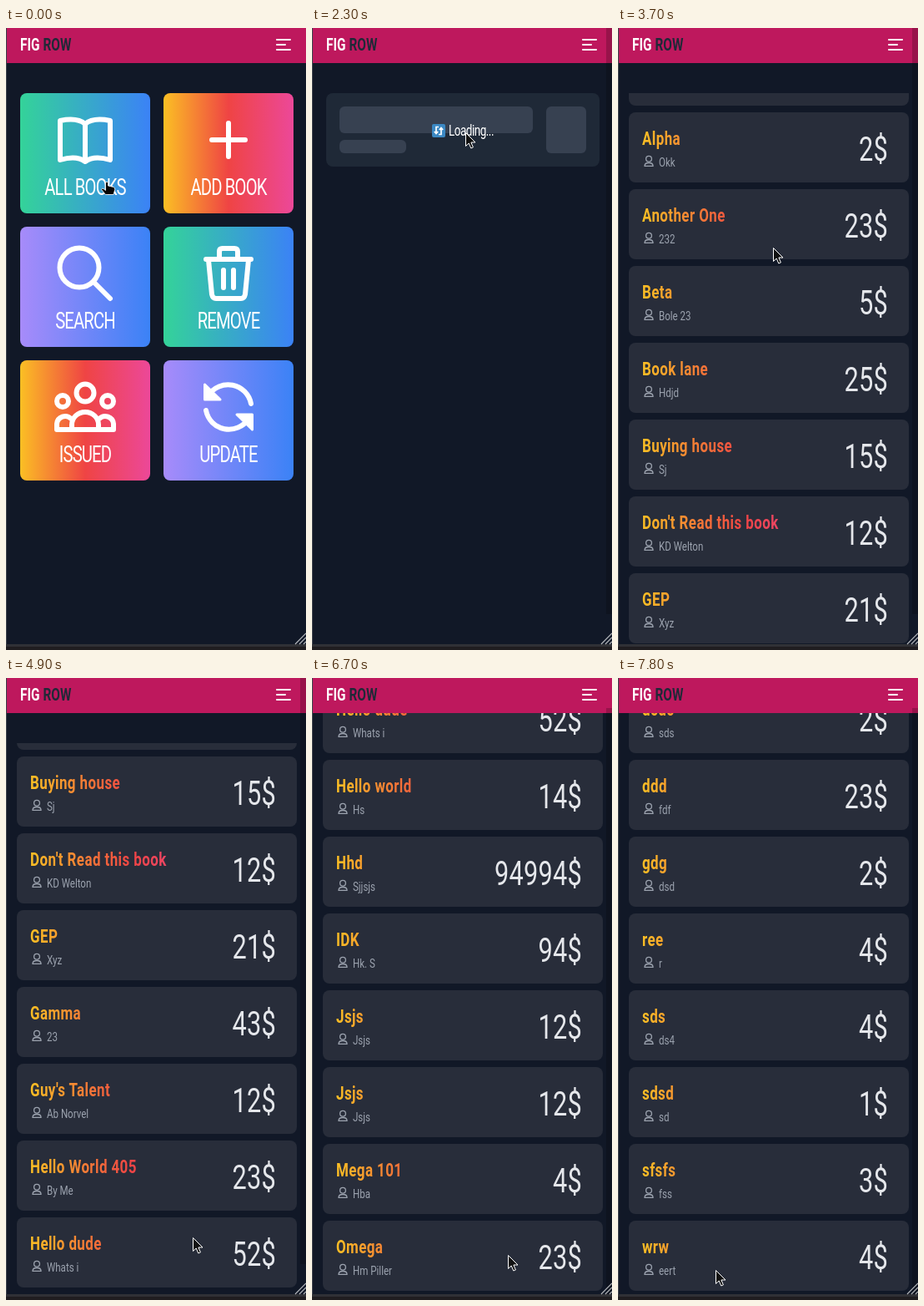
Recreate the animation shown at these times as an HTML page. Size 360 by 745 pixels, loop 8 s.

```html
<!DOCTYPE html>
<html lang="en">
<head>
<meta charset="utf-8">
<title>Book list</title>
<style>
html, body { margin: 0; width: 100%; height: 100%; overflow: hidden; background: #111827; }
svg { display: block; width: 360px; height: 745px; }
text { font-family: Roboto, "Open Sans", sans-serif; fill: #fff; white-space: pre; }
.logo { font-size: 20.5px; font-weight: 700; }
.caption { font-size: 27px; letter-spacing: -1.15px; text-anchor: middle; }
.loading { font-size: 18px; letter-spacing: -.65px; }
.title { font-size: 22.6px; font-weight: 700; letter-spacing: .55px; fill: url(#ink); }
.author { font-size: 15.4px; fill: #9ca3af; }
.price { font-size: 41px; letter-spacing: .3px; text-anchor: end; fill: #e5e7eb; }
.icon { fill: none; stroke: #fff; stroke-width: 6; stroke-linecap: round; stroke-linejoin: round; }
.person { fill: none; stroke: #9ca3af; stroke-width: 1.3; }
</style>
</head>
<body>
<svg id="stage" viewBox="0 0 360 745"></svg>
<script>
const CONDENSE = 0.75, LOOP = 8000, STEP = 100;
const CARD = 84, PITCH = 92, LIST_TOP = 86, PAGE_SHIFT = 36;

const books = `A lovely evening|Me|12
Abc|Xyz|5
Algo 101|Some crazy dude|52
Alpha|Okk|2
Another One|232|23
Beta|Bole 23|5
Book lane|Hdjd|25
Buying house|Sj|15
Don't Read this book|KD Welton|12
GEP|Xyz|21
Gamma|23|43
Guy's Talent|Ab Norvel|12
Hello World 405|By Me|23
Hello dude|Whats i|52
Hello world|Hs|14
Hhd|Sjjsjs|94994
IDK|Hk. S|94
Jsjs|Jsjs|12
Jsjs|Jsjs|12
Mega 101|Hba|4
Omega|Hm Piller|23
Open sky|Me|12
Qwe|Rty|5
Test 12|Sj|23
Xyz|Abc|4
asd|dsa|2
bcb|sd|3
dcdc|sds|2
ddd|fdf|23
gdg|dsd|2
ree|r|4
sds|ds4|4
sdsd|sd|1
sfsfs|fss|3
wrw|eert|4`.split('\n').map(row => row.split('|'));

const rect = (x, y, w, h, fill, r = 0) =>
  `<rect x="${x}" y="${y}" width="${w}" height="${h}" rx="${r}" fill="${fill}"/>`;
const text = (cls, x, y, str, extra = '') =>
  `<text class="${cls}" transform="translate(${x} ${y}) scale(${CONDENSE} 1)" ${extra}>${str}</text>`;
const gradient = (id, colors, attrs = '') =>
  `<linearGradient id="${id}" ${attrs}>${colors.map((c, i) =>
    `<stop offset="${i / (colors.length - 1)}" stop-color="${c}"/>`).join('')}</linearGradient>`;

const WARM = ['#fbbf24', '#ef4444', '#ec4899'];

// Icon paths are relative to the centre of each tile's icon area.
const tiles = [
  ['ALL BOOKS', 'sea', '<path d="M0 -19C-8 -26 -20 -25 -30 -23V24C-20 21 -8 20 0 26C8 20 20 21 30 24V-23C20 -25 8 -26 0 -19V25"/>'],
  ['ADD BOOK', 'warm', '<path d="M-20 0H20M0 -20V20"/>'],
  ['SEARCH', 'violet', '<circle cx="-7" cy="-7" r="23.5"/><path d="M10 10L30 30"/>'],
  ['REMOVE', 'sea', '<path d="M-27 -17H27M-11 -18V-26Q-11 -30 -7 -30H7Q11 -30 11 -26V-18M-24 -16L-20 25Q-19 30 -15 30H15Q19 30 20 25L24 -16M-6 -4V17M6 -4V17"/>'],
  ['ISSUED', 'warm', '<circle cy="-17" r="10.5"/><circle cx="-27" cy="-7" r="7"/><circle cx="27" cy="-7" r="7"/><path d="M-16 27V21A16 15 0 0 1 16 21V27ZM-16 27H-34V20A10 10 0 0 1 -17 14M16 27H34V20A10 10 0 0 0 17 14"/>'],
  ['UPDATE', 'violet', '<path d="M-24 -14A28 28 0 0 1 27 -4M24 14A28 28 0 0 1 -27 4"/><path fill="#fff" stroke-width="3" d="M-28.5 -27V-9H-10ZM28.5 27V9H10Z"/>']
];

const tile = ([label, fill, icon], i) => {
  const x = 17 + i % 2 * 172, y = 78 + (i >> 1) * 160;
  return rect(x, y, 156, 144, `url(#${fill})`, 8) +
    `<g class="icon" transform="translate(${x + 78} ${y + 56})">${icon}</g>` +
    text('caption', x + 78, y + 122, label);
};

const card = ([title, author, price], i) =>
  `<g transform="translate(0 ${LIST_TOP + i * PITCH})">` +
  rect(13, 0, 336, CARD, '#282d3a', 8) +
  text('title', 29, 39, title) +
  '<g class="person"><circle cx="37" cy="55.7" r="3.4"/><path d="M32 64.3Q32 60.5 37 60.5T42 64.3Z"/></g>' +
  text('author', 49, 65, author) +
  text('price', 324, 58, price + '$') + '</g>';

document.getElementById('stage').innerHTML = `
<defs>
  ${gradient('sea', ['#34d399', '#3b82f6'])}
  ${gradient('warm', WARM)}
  ${gradient('violet', ['#a78bfa', '#3b82f6'])}
  ${gradient('ink', WARM, `gradientUnits="userSpaceOnUse" x1="0" x2="${241 / CONDENSE}" y1="0" y2="0"`)}
  <clipPath id="view"><rect id="window" width="360" height="660" y="78"/></clipPath>
</defs>
${rect(0, 0, 360, 745, '#111827')}
<g id="home">${tiles.map(tile).join('')}</g>
<g id="wait">
  ${rect(17, 78, 328, 88, '#1f2937', 8)}
  ${rect(33, 94, 232, 32, '#374151', 6)}
  ${rect(33, 134, 80, 16, '#374151', 6)}
  ${rect(281, 94, 48, 56, '#374151', 6)}
  ${rect(144, 115, 16, 16, '#3b88c3', 2)}
  <path d="M152 118.5H149V126M146.8 124L149 126.5L151.2 124M152 127.5H155V120M152.8 122L155 119.5L157.2 122" fill="none" stroke="#fff" stroke-width="1.7"/>
  ${text('loading', 164, 128.5, 'Loading...')}
</g>
<g id="list" clip-path="url(#view)"><g id="cards">${books.map(card).join('')}</g></g>
${rect(0, 0, 360, 42, '#be185d')}
${text('logo', 17, 27, 'FIG')}
${text('logo', 44.5, 27, 'ROW', 'style="fill:#1f2937"')}
<path d="M325 14H341M325 20H335M325 26H341" stroke="#fff" stroke-width="2" stroke-linecap="round"/>
<rect id="thumb" x="353" width="7" height="702" fill="#000" opacity=".2"/>
${rect(0, 0, 1, 738, '#3a3f49')}
${rect(0, 738, 360, 3, '#303136')}
${rect(0, 741, 360, 4, '#201d20')}
<path d="M347 738L360 725M352 738L360 730M357 738L360 735" stroke="#b5b8bd" stroke-width="1.2"/>
<g id="cursor">
  <path id="arrow" d="M.5 .5V16.5L4.2 13L6.8 19L9.4 17.9L6.9 12H12Z" fill="#111" stroke="#fff"/>
  <path id="hand" d="M-1.5 1Q0 -.5 1.5 1V5L8 6.5Q10 7 9.7 9.5L8 15.5H-1.5L-6.5 9.5Q-6 7.5 -4 8.5L-1.5 10.5Z" fill="#050505" stroke="#fff" stroke-width=".8"/>
</g>`;

const $ = id => document.getElementById(id);
const show = (id, on) => $(id).setAttribute('display', on ? 'inline' : 'none');

// time, x, y of the pointer's hot spot
const pointer = [
  [0, 121, 184], [300, 126, 194], [700, 108, 178], [1200, 108, 178], [1900, 145, 147],
  [2100, 193, 104], [2400, 179, 136], [3100, 179, 136], [3700, 186, 263], [3800, 187, 265],
  [3900, 187, 265], [4000, 188, 266], [4100, 188, 266], [4200, 238, 726], [4500, 212, 690],
  [4900, 224, 670], [5300, 234, 673], [5400, 234, 673], [5500, 235, 674], [6600, 235, 674],
  [6700, 235, 691], [6900, 235, 691], [7800, 117, 709], [8000, 117, 709]
];

const scrollEnd = count => PITCH * (count - 1) - 564 - PAGE_SHIFT;
// start, end, distance reached
const scrolls = [
  [3100, 3800, 268], [4500, 4900, 636], [5000, 5300, scrollEnd(21)], [6900, 7800, scrollEnd(books.length)]
];

function pointerAt(t) {
  const i = pointer.findIndex(k => k[0] > t);
  const [a, b] = [pointer[i - 1], pointer[i]];
  const u = (t - a[0]) / (b[0] - a[0]);
  return [1, 2].map(n => Math.round(a[n] + (b[n] - a[n]) * u));
}

function scrollAt(t) {
  let y = 0;
  for (const [start, end, to] of scrolls) {
    const u = Math.min(1, Math.max(0, (t - start) / (end - start)));
    y += (to - y) * Math.sin(u * Math.PI / 2);
  }
  return Math.round(y);
}

function render(time) {
  const t = Math.floor(time % LOOP / STEP) * STEP;
  const shift = t >= 6000 ? PAGE_SHIFT : 0;
  show('home', t < 1100);
  show('wait', t >= 1100 && t < 3000);
  show('list', t >= 3000);
  show('thumb', t >= 1100);
  show('hand', t < 1100);
  show('arrow', t >= 1100);
  show('cursor', t < 4400 || t >= 4600);
  $('thumb').setAttribute('y', shift);
  $('window').setAttribute('y', 78 - shift);
  $('window').setAttribute('height', 660 + shift);
  $('cards').setAttribute('transform', `translate(0 ${-scrollAt(t) - shift})`);
  $('cursor').setAttribute('transform', `translate(${pointerAt(t)})`);
}

const began = performance.now();
function tick() {
  render(performance.now() - began);
  requestAnimationFrame(tick);
}
tick();
</script>
</body>
</html>
```
